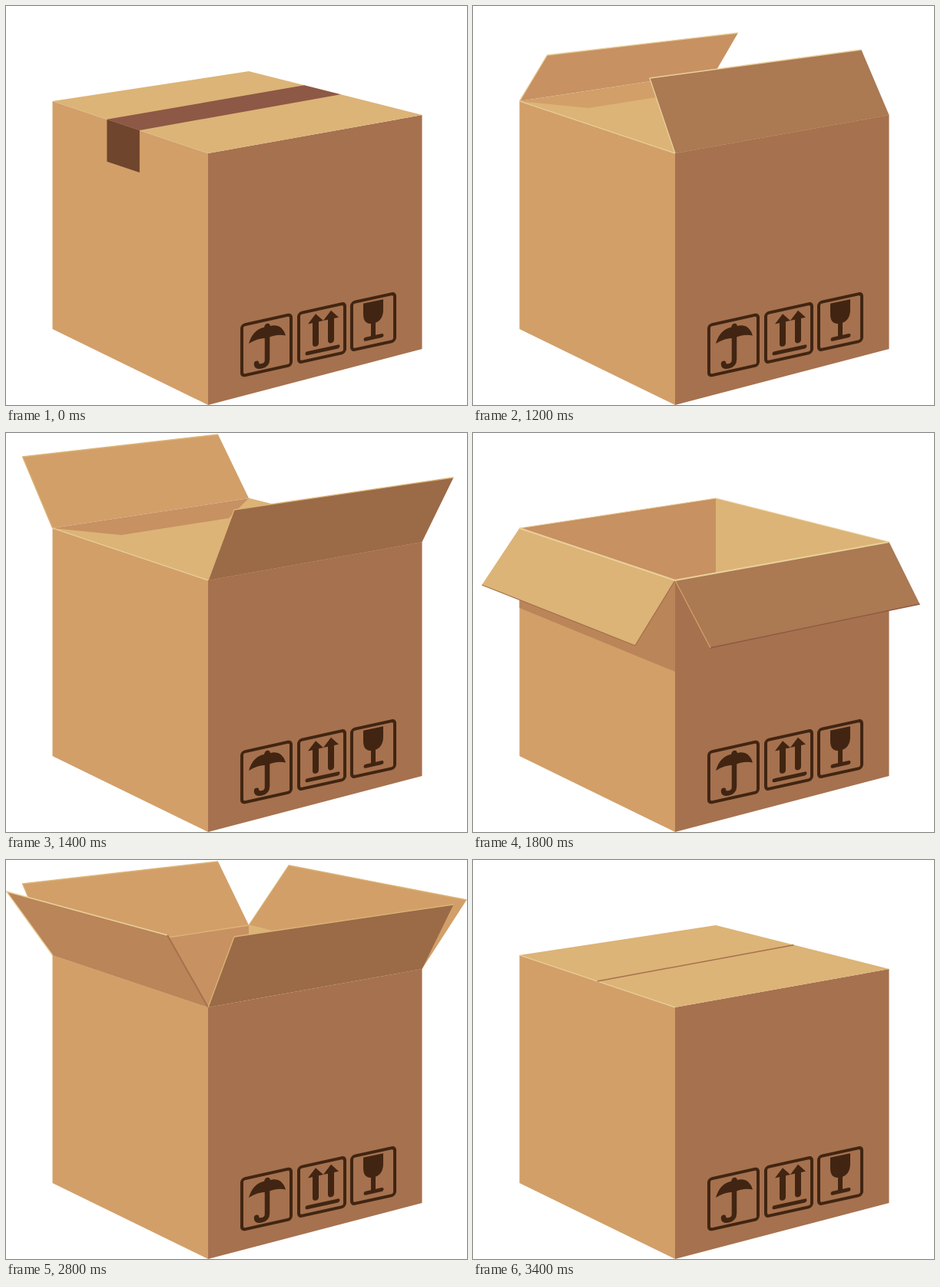
Animation, 600 px wide and 520 px high, one loop 3.6 s. Source, as an HTML page:

```html
<!DOCTYPE html>
<html lang="en">
<head>
<meta charset="utf-8">
<title>Opening box</title>
<style>
html, body { margin: 0; width: 100%; height: 100%; overflow: hidden; background: #fff; }
svg { display: block; width: 600px; height: 520px; }
</style>
</head>
<body>
<svg id="stage" viewBox="0 0 600 520"></svg>
<script>
const tan = '#d29f69', brown = '#a6714e', sand = '#dcb477', wall = '#c79162';
const umber = '#ab7952', shade = '#ba8558', dark = '#9b6a47', rim = '#ead09a';
const maroon = '#8d5845', ink = '#412512';

// Corners of the box top: left, back, right, front
const L = [60.5, 124], B = [316, 85], R = [541.5, 142], F = [263, 192];

const add = ([x, y], [dx, dy]) => [x + dx, y + dy];
const down = (p, h) => add(p, [0, h]);
const mix = (p, q, k) => p.map((v, i) => v + (q[i] - v) * k);
const poly = (fill, ...points) => `<polygon points="${points}" fill="${fill}"/>`;
const line = (color, width, ...points) =>
  `<polyline points="${points}" fill="none" stroke="${color}" stroke-width="${width}" stroke-linejoin="round"/>`;

// A flap hinged on the edge a-b; da and db lead from the hinge to its free corners
function flap(fill, a, b, da, db, edge = rim) {
  const p = add(a, da), q = add(b, db);
  return poly(fill, a, p, q, b) + line(edge, 1.3, a, p, q);
}

// A handling sign on the front face, drawn about its top centre
const sign = (x, y, w, h, art) => `<g transform="matrix(1 -.22 0 1 ${x} ${y})">
  <rect x="${2 - w / 2}" y="2" width="${w - 4}" height="${h - 4}" rx="4" stroke-width="4"/>${art}</g>`;
const stroke = (width, d) => `<path stroke-width="${width}" d="${d}"/>`;
const solid = d => `<path fill="${ink}" stroke="none" d="${d}"/>`;
const arrow = x => solid(`M${x} 7.5l10 11h-20z`) + stroke(8, `M${x} 16V46`);

const umbrella = solid('M-23 28Q-18 11-3 11Q-2 7 1 7Q4 7 5 11Q20 11 25 28Q13 23 1 26Q-11 23-23 28Z')
  + stroke(6.5, 'M1 24V54Q1 61-6 61Q-13 61-13 56');
const arrows = arrow(-8) + arrow(12) + stroke(5, 'M-19 56.5H21');
const glass = solid('M-13 6.5H13V20Q13 35 0 35Q-13 35-13 20Z') + stroke(6, 'M0 33V52') + stroke(5, 'M-10 53.5H11');

const body = poly(tan, L, F, down(F, 328), down(L, 297))
  + poly(brown, F, R, down(R, 305), down(F, 328))
  + `<g fill="none" stroke="${ink}" stroke-linecap="round">`
  + sign(339, 407, 68, 70, umbrella) + sign(411, 392, 64, 68, arrows) + sign(478, 378.5, 60, 66, glass)
  + '</g>';

// Points on the left and right edges of the top, for the seam and the tape
const onLeft = k => mix(L, F, k), onRight = k => mix(B, R, k);
const lid = poly(sand, L, B, R, F);
const leftRim = line(rim, 1.3, L, F);
const tape = poly(maroon, onLeft(.35), onRight(.32), onRight(.53), onLeft(.56))
  + poly('#6f452d', onLeft(.35), onLeft(.56), down(onLeft(.56), 55), down(onLeft(.35), 55));

const corner = down(B, 97);
const inside = poly(wall, L, B, corner, F) + poly(sand, B, R, corner);
// The short flaps still lying flat across the opening
const flat = color => poly(color, L, B, R, F) + poly(sand, L, [150, 133], [290, 111], B, R, F);

const backUp = flap(tan, L, B, [-39, -93], [-40, -83], sand);
const frontUp = flap(dark, F, R, [34, -92], [41, -84], sand);

// From fully open to taped shut
const poses = [
  inside + body
    + poly(shade, L, F, down(F, 119), down(L, 104))
    + flap(sand, F, L, [-52, 85], [-49, 74], brown)
    + flap(umber, F, R, [46, 88], [40, 81], maroon)
    + line(tan, 1.5, F, add(F, [46, 88]))
    + line(rim, 1, L, B, R) + line(rim, 2, L, F, R),

  backUp + flap(tan, B, R, [52, -78], [58, -90], sand) + inside
    + line(sand, 1.3, L, B, R) + body
    + flap(shade, L, F, [-60, -83], [-53, -94])
    + line(brown, 2, add(F, [-53, -94]), F)
    + frontUp,

  backUp + flat(wall) + body + leftRim + frontUp,

  flap(wall, L, B, [36, -60], [29, -50]) + flat(tan) + body + leftRim
    + flap(umber, F, R, [-33, -98], [-36, -85]),

  body + lid + leftRim + line(brown, 1.5, onLeft(.5), onRight(.45)),

  body + lid + tape
];

const stage = document.getElementById('stage');
let shown;

function draw() {
  // The box opens and closes symmetrically about step 11 of 18
  const step = Math.floor(performance.now() % 3600 / 200);
  const pose = Math.min(5, Math.max(0, Math.abs(step - 11) - 2));
  if (pose !== shown) stage.innerHTML = poses[shown = pose];
  requestAnimationFrame(draw);
}
draw();
</script>
</body>
</html>
```
